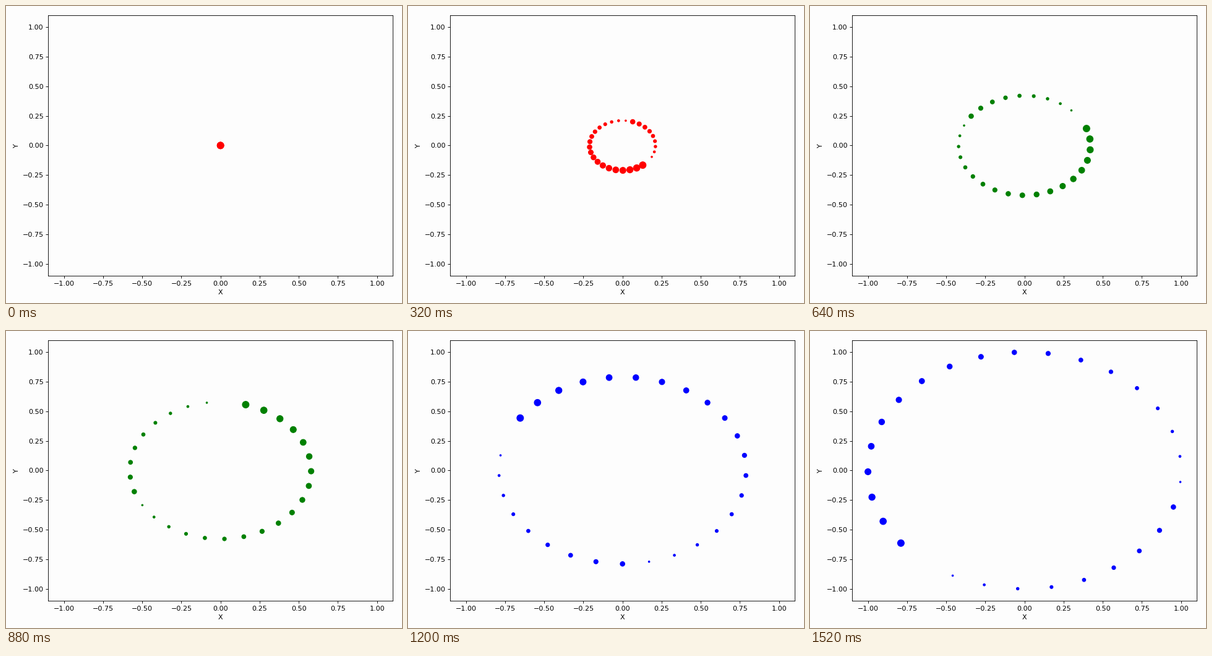
These frames come from a looping animation (640 px wide and 480 px high, 1600 ms). A matplotlib script:

```python
import numpy as np
import matplotlib.pyplot as plt
from matplotlib.animation import FuncAnimation

FRAMES = 20
POINTS = 30
COLORS = ["red", "green", "blue"]
MARGIN = 15  # pixels right of and above the axes

fig, ax = plt.subplots(figsize=(8, 6), dpi=80, facecolor="#fdfdfd")
ax.set_facecolor("#fdfdfd")
ax.set(xlim=(-1.1, 1.1), ylim=(-1.1, 1.1), xlabel="X", ylabel="Y")
fig.tight_layout()
fig.subplots_adjust(right=1 - MARGIN / 640, top=1 - MARGIN / 480)

# Dot areas grow along the ring and restart after every 20 dots.
sizes = 5 * np.arange(POINTS) % 100
shown = sizes > 0
angles = np.linspace(0, 2 * np.pi, POINTS)[shown]
dots = ax.scatter(np.zeros(angles.size), np.zeros(angles.size), s=sizes[shown])


def update(i):
    """Spin the ring by one turn while its radius grows from 0 to 1."""
    radius = i / (FRAMES - 1)
    turned = angles + 2 * np.pi * i / FRAMES
    dots.set_offsets(radius * np.column_stack([np.cos(turned), np.sin(turned)]))
    dots.set_color(COLORS[i // 7])
    return (dots,)


anim = FuncAnimation(fig, update, frames=FRAMES, interval=80, repeat=True, repeat_delay=0)
plt.show()
```
